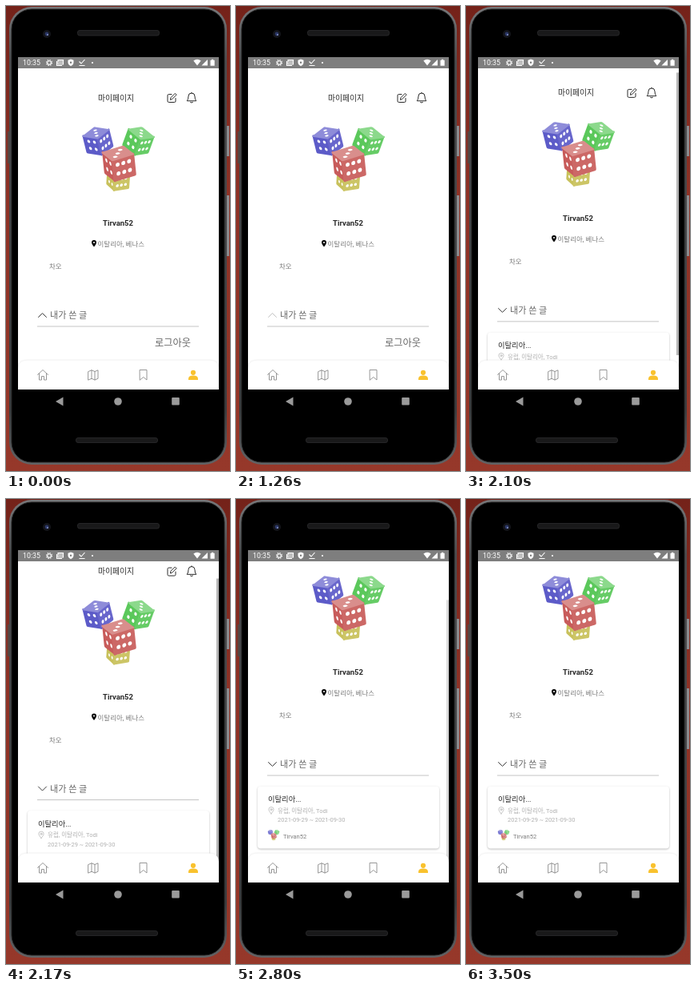
Animation of 280 by 582 pixels, one loop 3.78 s. Source, as an HTML page:

```html
<!DOCTYPE html>
<html lang="ko">
<head>
<meta charset="utf-8">
<style>
html, body { margin: 0; width: 100%; height: 100%; overflow: hidden; background: #8e3328; }
svg { display: block; width: 280px; height: 582px; }
text { font-family: Roboto, 'Noto Sans CJK KR', 'Noto Sans CJK', sans-serif; fill: #7c7c7c; }
.dark { fill: #2a2a2a; }
.mid { fill: #666; }
.pale { fill: #b0b0b0; }
.line { fill: none; stroke-linecap: round; stroke-linejoin: round; }
.card { filter: drop-shadow(0 1px .8px #0004); }
.tab { filter: drop-shadow(0 0 1px #0002); }
</style>
</head>
<body>
<svg viewBox="0 0 280 582">
<defs>
  <linearGradient id="wall" x2="0" y2="1">
    <stop stop-color="#742219"/><stop offset=".4" stop-color="#8e3226"/><stop offset="1" stop-color="#96382a"/>
  </linearGradient>
  <linearGradient id="rim" x2="0" y2="1">
    <stop stop-color="#77787a"/><stop offset=".12" stop-color="#4c4d4f"/>
    <stop offset=".88" stop-color="#3c3d3f"/><stop offset="1" stop-color="#626365"/>
  </linearGradient>
  <clipPath id="screen"><rect x="15" y="64" width="251" height="416"/></clipPath>
  <clipPath id="fold"><rect id="foldBox" x="15" y="402" width="251" height="0"/></clipPath>
  <g id="dice"></g>
</defs>

<!-- phone body -->
<rect width="280" height="582" fill="url(#wall)"/>
<path d="M276 150h3v38h-3zM276 237h3v76h-3z" fill="#8b8c8f"/>
<path d="M2 157h2v40h-2z" fill="#5b4540"/>
<rect x="4" y="1" width="272" height="573" rx="28" fill="url(#rim)"/>
<rect x="7" y="4" width="266" height="567" rx="25" stroke="#222" />
<g fill="#19191a" stroke="#2c2c2e" stroke-width=".8">
  <rect x="89.5" y="30.5" width="102" height="6.5" rx="2.5"/>
  <rect x="87.5" y="540.5" width="102" height="6" rx="2.5"/>
</g>
<circle cx="51" cy="35" r="5" fill="#14151a"/>
<circle cx="51" cy="35" r="2.4" fill="#2b3766"/>
<circle cx="52" cy="36" r="1" fill="#8a97c8"/>
<g fill="#9a9a9a">
  <path d="M62 495l9.5-5.5v11z"/><circle cx="140" cy="495" r="4.8"/><rect x="207.2" y="490" width="9.6" height="9.6" rx="1"/>
</g>

<g clip-path="url(#screen)">
  <rect x="15" y="64" width="251" height="416" fill="#fff"/>
  <g id="page">
    <text class="dark" x="137.5" y="118.6" font-size="9.8" text-anchor="middle">마이페이지</text>
    <g class="line" stroke="#2a2a2a">
      <path d="M207 110.5h-3.5q-1.5 0-1.5 1.5v7q0 1.5 1.5 1.5h7q1.5 0 1.5-1.5v-3.5M205.5 117l.5-2.3 5.3-5.3 1.8 1.8-5.3 5.3z"/>
      <path d="M226.500 118.500q1.500-1.500 1.500-5.500a4 4 0 0 1 8 0q0 4 1.500 5.500zM230.500 120.500q1.500 1.300 3 0M232 109v-.7"/>
    </g>
    <use href="#dice"/>
    <text class="dark" x="140" y="275.3" font-size="9.5" text-anchor="middle" font-weight="700">Tirvan52</text>
    <path d="M110 301.500q-3-3.800-3-5.500a3 3 0 0 1 6 0q0 1.700-3 5.500z"/>
    <circle cx="110" cy="296" r="1" fill="#fff"/>
    <text x="114.5" y="301.2" font-size="8.5">이탈리아, 베나스</text>
    <text x="54" y="329.3" font-size="8.5">차오</text>
    <path id="arrow" class="line" stroke="#3a3a3a"/>
    <text class="mid" x="55" y="391.2" font-size="11.1">내가 쓴 글</text>
    <path d="M39 401h202" stroke="#c4c4c4"/>
    <g clip-path="url(#fold)">
      <rect class="card" x="27" y="414.5" width="227" height="78" rx="4" fill="#fff"/>
      <text class="dark" x="40" y="434.3" font-size="9.3">이탈리아...</text>
      <g class="line" stroke="#b0b0b0" stroke-width=".7">
        <path d="M44 449q-3.200-4-3.200-5.300a3.200 3.200 0 0 1 6.400 0q0 1.300-3.200 5.300z"/><circle cx="44" cy="443.7" r="1.1"/>
      </g>
      <g font-size="7.5">
        <text class="pale" x="52" y="447.7">유럽, 이탈리아, Todi</text>
        <text class="pale" x="52" y="459">2021-09-29 ~ 2021-09-30</text>
        <text x="59" y="479.7">Tirvan52</text>
      </g>
      <use href="#dice" transform="translate(24.6 445) scale(.16)"/>
    </g>
    <text id="logout" class="mid" x="186" y="425.5" font-size="12.2">로그아웃</text>
  </g>
  <rect id="thumb" x="263" width="3" height="353.6" fill="#b5b5b5"/>

  <!-- tab bar -->
  <path class="tab" d="M15 484V455q0-11.500 12-11.500h227q12 0 12 11.500v29z" fill="#fff"/>
  <g class="line" stroke="#8c8c8c" stroke-width=".9">
    <path d="M39.500 461.500l6.500-6 6.500 6M41.500 460v8h3v-4.500h3v4.500h3v-8"/>
    <path d="M103 457.500l4-1.700 4 1.700 4-1.700v10.500l-4 1.700-4-1.700-4 1.700zM107 455.800v10.500M111 457.500v10.500"/>
    <path d="M167.500 455.500h8.500v12.500l-4.250-3.500-4.250 3.500z"/>
  </g>
  <g fill="#f9c22e"><circle cx="234" cy="458.8" r="3.1"/><path d="M228 468v-1.500q0-4 6-4t6 4v1.500z"/></g>

  <!-- status bar -->
  <rect x="15" y="64" width="251" height="14" fill="#7e7e7e"/>
  <text x="21" y="74.3" font-size="8.8" style="fill:#fff">10:35</text>
  <g fill="none" stroke="#fff" stroke-width="1.1">
    <circle cx="54" cy="71" r="2.3"/>
    <circle cx="54" cy="71" r="3.5" stroke-dasharray="1.4 1.35"/>
    <path d="M63.500 69v5.500h6.500M65 67.500h6.500v5.500h-6.500zM65 69h6.500M66 71h5"/>
    <path d="M91.500 69.500l2.500 2.500 4.500-5M91.500 74.500h7"/>
  </g>
  <g fill="#fff">
    <path d="M81 66.500l3.500 1.300v2.700q0 3-3.500 4.700-3.500-1.700-3.500-4.700v-2.700z"/>
    <circle cx="81" cy="70.7" r="1.2" fill="#7e7e7e"/>
    <circle cx="108" cy="71" r="1.1"/>
    <path d="M234.300 68.500q4.700-3.600 9.400 0l-4.700 6z"/>
    <path d="M244.500 74.500l7.500-7.500v7.500z"/>
    <path d="M255.500 67.700h1.500v-1h2.200v1h1.500v7h-5.200z"/>
  </g>
</g>
</svg>
<script>
const el = id => document.getElementById(id);
const set = (id, name, value) => el(id).setAttribute(name, value);
const clamp = v => Math.min(1, Math.max(0, v));

// Odd counts run along the diagonal, even counts fill two rows.
function pips(n) {
  return Array.from({ length: n }, (_, k) => {
    const step = (k + 1) / (n + 1);
    const x = n % 2 ? step : ((k >> 1) + 0.75) / (n / 2 + 0.5);
    const y = n % 2 ? step : 0.28 + 0.44 * (k % 2);
    return `<circle cx="${x}" cy="${y}" r=".1" fill="#fff"/>`;
  }).join('');
}

// A cube seen from above: each face is a unit square laid along two projected edges.
function die(x, y, size, yaw, roll, hue) {
  const pitch = 0.45, [s, c] = [Math.sin(yaw), Math.cos(yaw)];
  const right = [c * size, -s * Math.sin(pitch) * size];
  const back = [-s * size, -c * Math.sin(pitch) * size];
  const down = [0, Math.cos(pitch) * size];
  const corner = [0, 1].map(i => -(right[i] + back[i] + down[i]) / 2);
  const face = (a, b, light, n) => {
    const colour = `hsl(${hue} 50% ${light}%)`;
    return `<g transform="matrix(${[...a, ...b, ...corner]})"><rect width="1" height="1" fill="${colour}"
      stroke="${colour}" stroke-width=".14" stroke-linejoin="round"/>${pips(n)}</g>`;
  };
  return `<g transform="translate(${x} ${y}) rotate(${roll})">` +
    face(back, down, 57, 4) + face(right, down, 60, 6) + face(right, back, 70, 3) + '</g>';
}

el('dice').innerHTML =
  die(115, 169, 23, 0.8, -14, 241) +
  die(165.5, 169, 23, 0.9, 20, 120) +
  die(140, 216, 20, 0.5, 4, 56) +
  die(141, 197, 28, 0.42, -6, 1);

const LOOP = 3780, STEP = 70, FOLD = 95, VIEW = 402, MAX_SCROLL = 55;

function draw(now) {
  const t = Math.floor(now % LOOP / STEP) * STEP;
  const progress = (from, length) => clamp((t - from) / length);

  // a tap on the heading unfolds the list
  const open = t >= 1400;
  const grow = open ? FOLD * (1 - (1 - progress(1370, 300)) ** 3) : 0;
  set('foldBox', 'height', grow);
  set('logout', 'transform', `translate(0 ${grow})`);
  set('arrow', 'd', open ? 'M40.5 384.5l5 5 5-5' : 'M40.5 389.5l5-5 5 5');
  set('arrow', 'opacity', t < 1260 ? 1 : 0.3 + 0.7 * progress(1400, 210));

  // swipe up, then the scroll bar fades
  const scroll = MAX_SCROLL * progress(2030, 210) ** 2;
  set('page', 'transform', `translate(0 ${-scroll})`);
  set('thumb', 'y', 78 + scroll * VIEW / (VIEW + MAX_SCROLL));
  set('thumb', 'opacity', scroll ? 1 - progress(2660, 280) : 0);
}

const start = performance.now();
(function tick() {
  draw(performance.now() - start);
  requestAnimationFrame(tick);
})();
</script>
</body>
</html>
```
